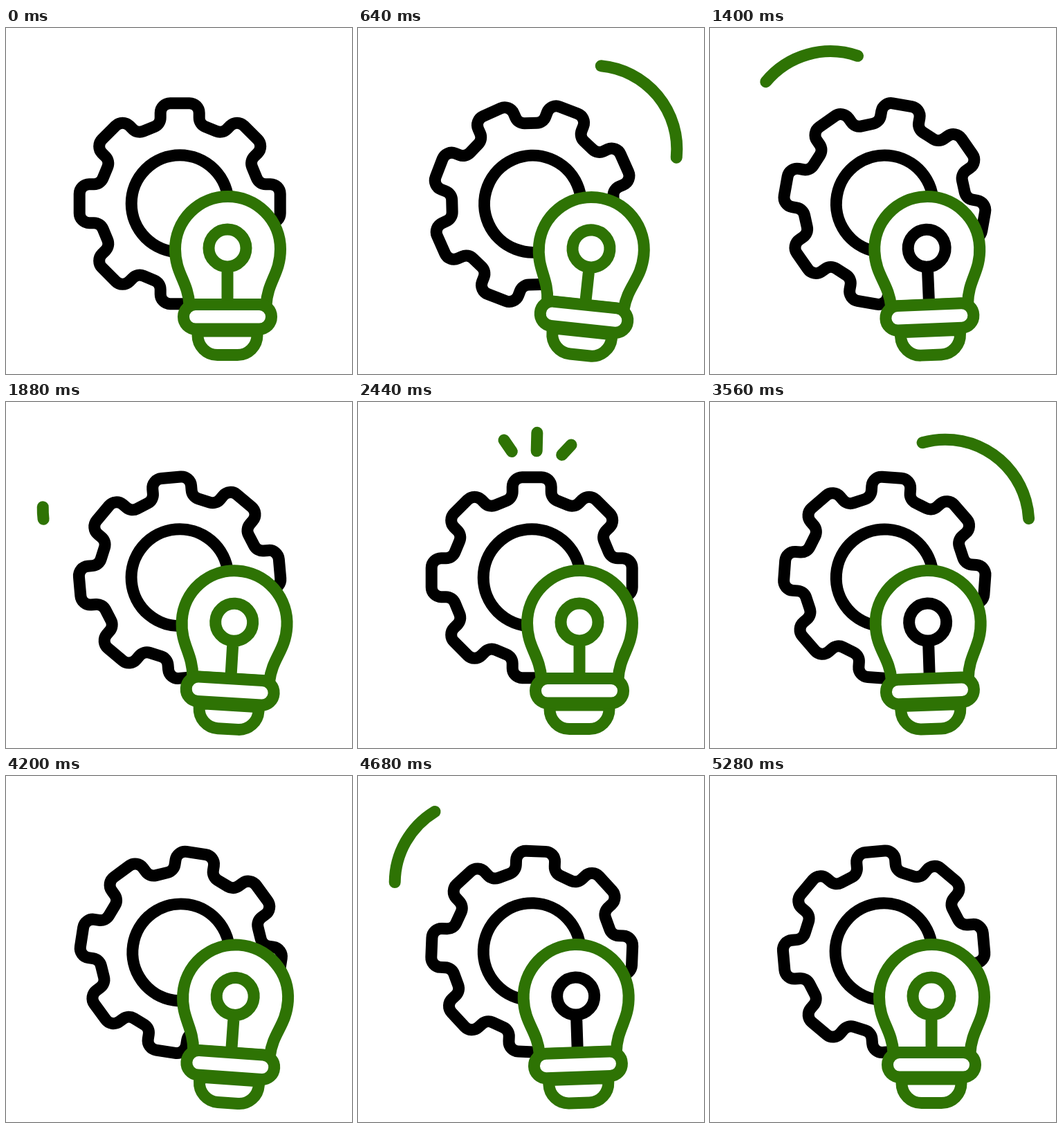
Write an HTML page with a canvas that moves like this. It is 500 px wide and 500 px high and loops after 5320 ms.

```html
<!DOCTYPE html>
<html lang="en">
<head>
<meta charset="utf-8">
<title>Gear and bulb</title>
<style>
html, body { margin: 0; width: 100%; height: 100%; overflow: hidden; background: #fff; }
canvas { display: block; }
</style>
</head>
<body>
<canvas id="stage" width="500" height="500"></canvas>
<script>
const ctx = document.getElementById('stage').getContext('2d');
const GREEN = '#2e7304', BLACK = '#000';
const STEP = 40, LOOP = 5320, CYCLE = 76, SWING_END = 56;
const RAD = Math.PI / 180;

const clamp = p => Math.min(1, Math.max(0, p));
const progress = (n, start, end) => clamp((n - start) / (end - start));
const smooth = p => p * p * (3 - 2 * p);
const easeOut = p => 1 - (1 - p) ** 2;
const mix = (a, b, p) => a + (b - a) * p;

function roundedPolygon(points, radius) {
  const path = new Path2D();
  const last = points[points.length - 1];
  path.moveTo((last[0] + points[0][0]) / 2, (last[1] + points[0][1]) / 2);
  points.forEach((p, i) => path.arcTo(...p, ...points[(i + 1) % points.length], radius));
  path.closePath();
  return path;
}

function gearOutline() {
  const tooth = [[-28, -114.7], [-28, -145], [28, -145], [28, -114.7]];
  const points = [];
  for (let i = 0; i < 8; i++) {
    const c = Math.cos(i * 45 * RAD), s = Math.sin(i * 45 * RAD);
    for (const [x, y] of tooth) points.push([251.2 + x * c - y * s, 253.7 + x * s + y * c]);
  }
  return roundedPolygon(points, 14);
}

const circle = (x, y, r) => {
  const path = new Path2D();
  path.arc(x, y, r, 0, 2 * Math.PI);
  return path;
};

const gear = gearOutline();
const ring = circle(251.2, 253.7, 70);
const glass = new Path2D('M265 400C263 366 244.5 355 244.5 319.5A76 76 0 0 1 396.5 319.5C396.5 355 378 366 376 400Z');
const base = new Path2D('M277 438V444A28.5 28.5 0 0 0 305.5 472.5H334.5A28.5 28.5 0 0 0 363 444V438Z');
const rim = new Path2D();
rim.roundRect(256.5, 399.6, 127, 35.5, 17.5);
const filament = circle(320, 318, 27);
filament.moveTo(320, 345);
filament.lineTo(320, 400);

const sparks = [
  [225.4, 76, 208.5, 51.4],
  [258, 78, 259, 38.5],
  [291, 80.3, 311, 58.8]
];

function draw(path, color, fill) {
  if (fill) {
    ctx.fillStyle = '#fff';
    ctx.fill(path);
  }
  ctx.strokeStyle = color;
  ctx.stroke(path);
}

function turned(x, y, degrees, paint) {
  ctx.save();
  ctx.translate(x, y);
  ctx.rotate(degrees * RAD);
  ctx.translate(-x, -y);
  paint();
  ctx.restore();
}

function gearAngle(n) {
  if (n > SWING_END) return 0;
  return 100 * smooth(progress(n, 0, 26.3)) - 105 * smooth(progress(n, 28, 43.5));
}

// The bulb leans right while lit, then left while dark.
function rocking(n) {
  if (n < 1 || n >= SWING_END) return { tilt: 0, lit: true };
  const u = (n + 0.3) % 14;
  return u < 6.4
    ? { tilt: 6.7 * Math.sin(Math.PI * u / 6.4), lit: true }
    : { tilt: -6.7 * Math.sin(Math.PI * (u - 6.4) / 7.6), lit: false };
}

function drawSweep(x, y, from, to, tail, head) {
  if (head - tail < 0.01) return;
  const path = new Path2D();
  path.arc(x, y, 120.8, mix(from, to, tail) * RAD, mix(from, to, head) * RAD, to < from);
  draw(path, GREEN);
}

function drawSparks(n) {
  const head = easeOut(progress(n, 57, 63.5));
  const tail = smooth(progress(n, 58, 69));
  if (head - tail < 0.01) return;
  for (const [x0, y0, x1, y1] of sparks) {
    const path = new Path2D();
    path.moveTo(mix(x0, x1, tail), mix(y0, y1, tail));
    path.lineTo(mix(x0, x1, head), mix(y0, y1, head));
    draw(path, GREEN);
  }
}

function render(n) {
  ctx.fillStyle = '#fff';
  ctx.fillRect(0, 0, 500, 500);
  ctx.lineWidth = 17;
  ctx.lineCap = ctx.lineJoin = 'round';

  turned(251.5, 255, gearAngle(n), () => {
    draw(gear, BLACK);
    draw(ring, BLACK);
  });

  const { tilt, lit } = rocking(n);
  turned(320, 479, tilt, () => {
    draw(glass, GREEN, true);
    draw(filament, lit ? GREEN : BLACK);
    draw(base, GREEN, true);
    draw(rim, GREEN, true);
  });

  drawSweep(340, 175, -115, 7.5, smooth(progress(n, 9.8, 28.9)), easeOut(progress(n, 1, 18)));
  drawSweep(174, 154.5, -68, -187, smooth(progress(n, 33.5, 49.6)), easeOut(progress(n, 29, 45)));
  drawSparks(n);
}

function tick() {
  render(Math.floor(performance.now() % LOOP / STEP) % CYCLE);
  requestAnimationFrame(tick);
}
tick();
</script>
</body>
</html>
```
